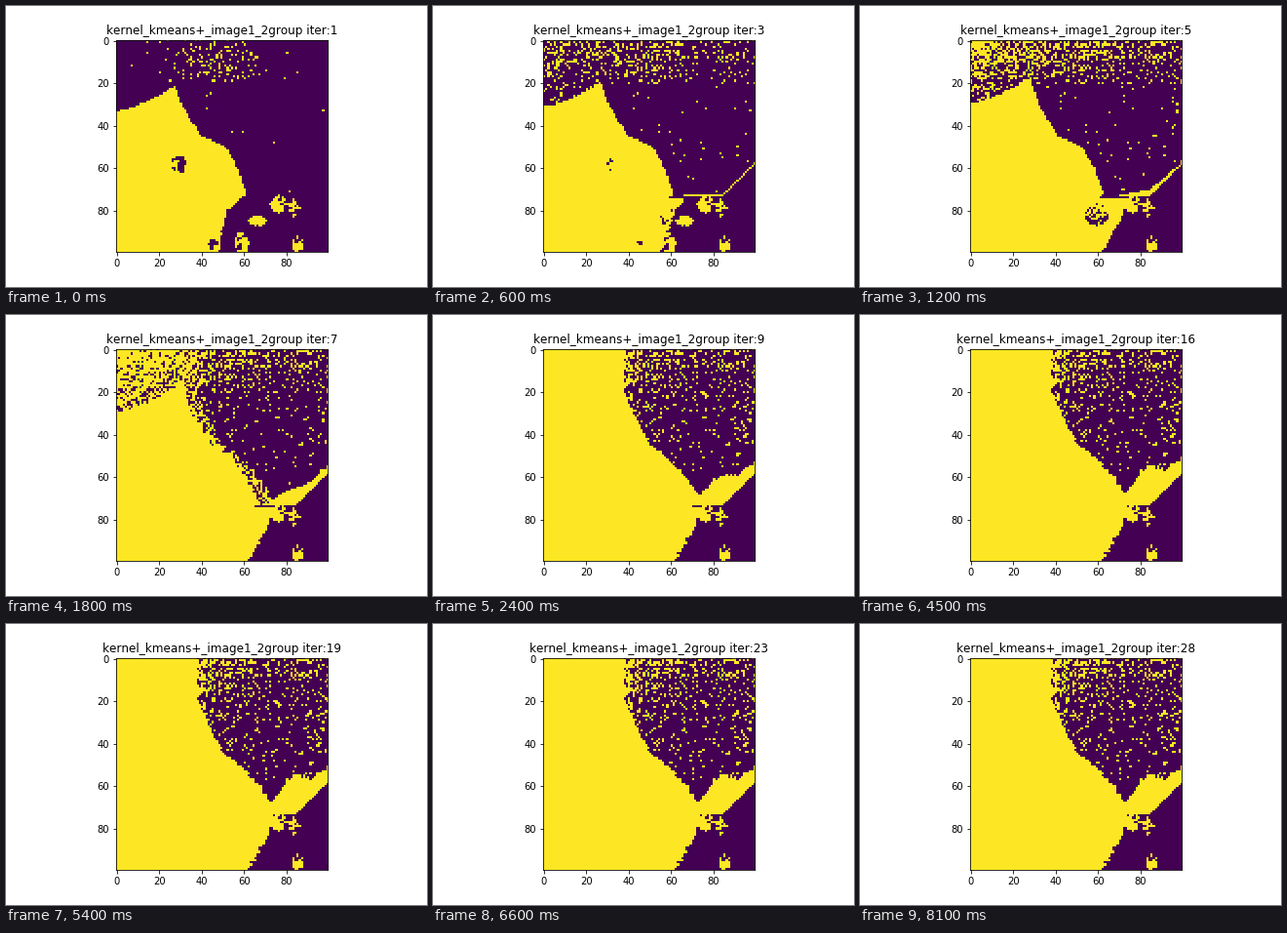
Animation of 432 by 288 pixels, one loop 8.4 s. Source, as a matplotlib script:

```python
import numpy as np
import matplotlib.pyplot as plt
from matplotlib.animation import FuncAnimation

STEPS = 28
SIZE = 100

rng = np.random.default_rng(7)
GRAIN = rng.random((SIZE, SIZE))
CLUMP = (GRAIN + np.roll(GRAIN, 1, 0) + np.roll(GRAIN, 1, 1)) / 3
ROW_JITTER = rng.uniform(-1, 1, (SIZE, 1))
COL_JITTER = rng.uniform(-1, 1, SIZE)
Y, X = np.mgrid[:SIZE, :SIZE]

# Right border of the large cluster: rows, first and last x.
EDGE_Y = [0, 20, 30, 45, 50, 60, 72, 80, 90, 99]
EDGE_FIRST = np.interp(Y, EDGE_Y, [27, 27, 30, 39.5, 51, 56.5, 61, 52, 49, 48])
EDGE_LAST = np.interp(Y, EDGE_Y, [38, 38, 42, 50, 57, 67, 75, 72, 67, 62])

# Band that opens towards the right side of the image.
BAND_LOW = 73 - np.maximum(0, X - 84)
BAND_TOP = np.interp(X, [70, 76, 83, 91, 99], [73, 63, 54, 57, 51])

# Loose patches as ellipses: cx, cy, rx, ry.
LIGHT = [(59, 95, 3.5, 5), (66, 85, 4, 2.5), (76, 77, 4, 4),
         (83, 79, 3, 4), (85, 96, 2.5, 4)]
HOLES = [(29, 58, 3.5, 5), (45, 96, 2.5, 3)]
POCKET = [(59, 82, 5.5, 5)]


def ease(step, start, end):
    t = np.clip((step - start) / (end - start), 0, 1)
    return t * t * (3 - 2 * t)


def mix(a, b, t):
    return a + (b - a) * t


def patches(shapes, level):
    mask = np.zeros((SIZE, SIZE), bool)
    for cx, cy, rx, ry in shapes:
        mask |= ((X - cx) / rx) ** 2 + ((Y - cy) / ry) ** 2 <= 1
    return mask & (CLUMP < level)


def noise(step):
    """Chance of a light speck in each cell."""
    first = .2 * np.exp(-((X - 45) / 17) ** 2) * (Y < 20) + .003

    sky = (.18 + .65 * np.exp(-X / 35)) * (1.2 - .035 * Y)
    rest = np.where(X < 28, .35, .01 + .015 * (X > 65))
    second = np.where(Y < 21, sky, rest)

    gap = X - EDGE_LAST
    near = .5 * np.exp(-np.maximum(gap, 0) / 10 - (Y / 24) ** 4)
    far = .11 * np.exp(-(Y / 50) ** 4) + .18 * np.exp(-Y / 5) + .02
    growth = .85 + .15 * ease(step, 8, STEPS)
    last = np.where(gap < 0, 1, (near + far) * growth)

    return mix(mix(first, second, ease(step, 1, 5)), last, ease(step, 5, 9))


def labels(step):
    early, late = ease(step, 1, 5), ease(step, 3, 12)

    edge = mix(EDGE_FIRST, EDGE_LAST, np.where(Y > 74, early, late))
    edge = edge + mix(.3, 1.2, late) * ROW_JITTER
    top = 33.5 - .25 * X - .007 * X ** 2 - 3.5 * early
    band_top = mix(BAND_LOW, BAND_TOP, late) + 1.2 * late * COL_JITTER

    body = (X <= edge) & (Y >= top)
    band = (X >= 66) & (Y >= band_top) & (Y <= BAND_LOW) & (step > 2)
    specks = (GRAIN < noise(step)) & (Y < band_top) & ((X > edge) | (Y < top))
    light = body | band | specks | patches(LIGHT, .6)
    dark = patches(HOLES, .55 * (1 - early))
    dark |= patches(POCKET, .5 * early * (1 - ease(step, 5, 8)))
    return (light & ~dark).astype(float)


# Whole-pixel kerning keeps the title at its full width.
plt.rcParams["text.kerning_factor"] = 6
plt.rcParams["font.family"] = "DejaVu Sans"

fig, ax = plt.subplots(figsize=(6, 4), dpi=72, facecolor="white")
fig.subplots_adjust(left=.125, right=.9, bottom=.125, top=.88)
image = ax.imshow(labels(1), cmap="viridis", vmin=0, vmax=1,
                  interpolation="nearest")
ax.set_xticks(range(0, SIZE, 20))
ax.set_yticks(range(0, SIZE, 20))
title = ax.set_title("", fontsize=12)


def draw(frame):
    step = frame + 1
    image.set_data(labels(step))
    title.set_text(f"kernel_kmeans+_image1_2group iter:{step}")
    return image, title


anim = FuncAnimation(fig, draw, frames=STEPS, interval=300, repeat=True,
                     repeat_delay=0, blit=False)
plt.show()
```
